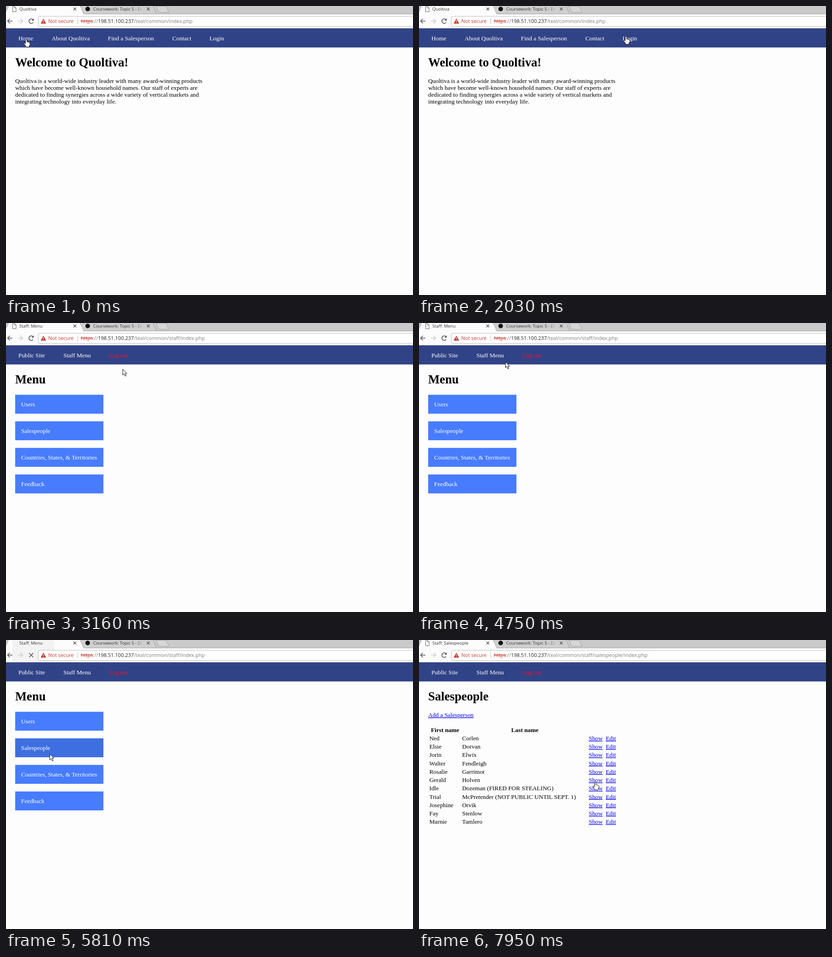
These frames come from a looping animation (887x631 px, 8 s). An HTML page:

```html
<!DOCTYPE html>
<html lang="en">
<head>
<meta charset="utf-8">
<title>Staff site walkthrough</title>
<style>
  html, body { margin: 0; width: 100%; height: 100%; overflow: hidden; background: #fdfdfd; }
  svg { display: block; width: 887px; height: 631px; }
  text { white-space: pre; }
  .ui { font: 11px "Open Sans", sans-serif; fill: #7c7c7c; }
  .tab { font-size: 9.5px; fill: #333; }
  .page { font: 13.3px "Liberation Serif", serif; }
  .title { font-size: 26.6px; font-weight: bold; }
  .bold { font-weight: bold; }
  .white { fill: #fff; }
  .red { fill: #f31225; }
  .under { fill: #00e; text-decoration: underline; }
  .line { fill: none; stroke: #555; stroke-width: 1.6; }
  .edge { stroke: #a2a2a2; }
</style>
</head>
<body>
<svg viewBox="0 0 887 631">
  <defs>
    <linearGradient id="fade">
      <stop offset="0" stop-color="#cfcfcf" stop-opacity="0"/>
      <stop offset=".8" stop-color="#cfcfcf"/>
    </linearGradient>
  </defs>
  <rect width="887" height="631" fill="#fdfdfd"/>

  <!-- browser tabs -->
  <rect width="887" height="18" fill="#cacaca"/>
  <path class="edge" d="M160 -1H320L328 17.5H160Z" fill="#cfcfcf"/>
  <path class="edge" d="M327 .5H349L355.5 14H335Q333 14 332 12Z" fill="#d6d6d6"/>
  <path class="edge" d="M-1 17.5V14L6 -1H161L169 17.5H888" fill="none"/>
  <path d="M0 19V14L6 0H161L169 18H887V48H0Z" fill="#fcfcfc"/>
  <rect id="loadPatch" x="14" y="1" width="91" height="47" fill="#f3f3f3"/>
  <path id="pageIcon" d="M14.5 1.5H19L22 4.5V12.5H14.5ZM19 1.5V4.5H22" fill="#fff" stroke="#666"/>
  <text id="tabTitle" class="ui tab" x="29" y="10"></text>
  <circle cx="178" cy="6.5" r="5" fill="#111"/>
  <text class="ui tab" x="190" y="10">Coursework: Topic 5 - Dr</text>
  <rect x="282" width="21" height="16" fill="url(#fade)"/>
  <path class="line" d="M147 3.5l6 6m0-6l-6 6M307 3.5l6 6m0-6l-6 6" style="stroke-width:1.4"/>

  <!-- toolbar -->
  <path class="line" d="M14 33H3.5M8.5 28L3.5 33L8.5 38"/>
  <path class="line" d="M26 33H36.5M31.5 28L36.5 33L31.5 38" style="stroke:#cbcbcb"/>
  <g id="reload">
    <path class="line" d="M59 36A5 5 0 1 1 58.5 29.4"/>
    <path d="M60.5 27V32H55.5Z" fill="#555"/>
  </g>
  <path id="stop" class="line" d="M50.5 28.5l9 9m0-9l-9 9"/>
  <rect x="70.5" y="22.5" width="830" height="22" rx="2" fill="#fff" stroke="#bdbdbd"/>
  <path d="M81.5 27.5L87.5 38.5H75.5Z" fill="#c5372c"/>
  <path d="M81.5 31V34.5M81.5 35.7V37" stroke="#fff" stroke-width="1.3"/>
  <text class="ui" x="92" y="37" style="fill:#c5372c">Not secure</text>
  <path d="M156.5 27V40" stroke="#bbb"/>
  <text class="ui" x="163" y="37"><tspan fill="#c5372c" text-decoration="line-through">https</tspan>://<tspan fill="#222">198.51.100.237</tspan><tspan id="urlPath"></tspan></text>
  <path d="M0 48.5H887" stroke="#b9b9b9"/>
  <rect y="49" width="887" height="41.5" fill="#314387"/>

  <g id="pages" class="page"></g>
  <g id="cursor" stroke="#111" fill="#fff" stroke-linejoin="round">
    <path id="hand" d="M-1.5 1.2Q0-.8 1.5 1.2V6.2Q3.2 5 4.2 6.8Q6 6 6.6 7.8Q8.3 7.4 8.3 9.5V12.5L6.6 15V17.5H-1V15.5L-4.6 10.5Q-5 8.6-3.2 8.8L-1.5 10.3Z"/>
    <path id="arrow" d="M.5 .8V13.7L3.5 10.9L5.7 16L7.8 15.1L5.7 10.2H9.5Z"/>
  </g>
</svg>

<script>
const LOOP = 8000, LOAD_START = 5810;
const $ = id => document.getElementById(id);
const text = (x, y, content, cls = '') => `<text x="${x}" y="${y}" class="${cls}">${content}</text>`;
const nav = items => items.map(([x, label, cls = 'white']) => text(x, 74.5, label, 'link ' + cls)).join('');
const heading = label => text(20, 132, label, 'title');

const staffNav = nav([[27, 'Public Site'], [125, 'Staff Menu'], [225, 'Log out', 'link red']]);

const intro = [
  'Quoltiva is a world-wide industry leader with many award-winning products',
  'which have become well-known household names. Our staff of experts are',
  'dedicated to finding synergies across a wide variety of vertical markets and',
  'integrating technology into everyday life.'
];

const buttons = ['Users', 'Salespeople', 'Countries, States, &amp; Territories', 'Feedback'];

const people = [
  'Ned|Corlen', 'Elsie|Dorvan', 'Jorin|Elwix', 'Walter|Fendleigh', 'Rosalie|Garrimor', 'Gerald|Holven',
  'Idle|Dozeman (FIRED FOR STEALING)', 'Trial|McPretender (NOT PUBLIC UNTIL SEPT. 1)',
  'Josephine|Orvik', 'Fay|Stenlow', 'Marnie|Tamlero'
];

const personRow = (person, i) => {
  const y = 219 + 18.22 * i, [first, last] = person.split('|');
  return text(22.5, y, first) + text(94, y, last) +
    text(370, y, 'Show', 'link under') + text(407, y, 'Edit', 'link under');
};

const pages = [
  {
    start: 0, tab: 'Quoltiva', path: '/teal/common/index.php',
    body: nav([[27, 'Home'], [99.5, 'About Quoltiva'], [222, 'Find a Salesperson'], [362.5, 'Contact'], [443.5, 'Login']]) +
      heading('Welcome to Quoltiva!') + intro.map((line, i) => text(20, 168 + 15 * i, line)).join('')
  },
  {
    start: 2170, tab: 'Staff: Menu', path: '/teal/common/staff/index.php',
    body: staffNav + heading('Menu') + buttons.map((label, i) =>
      `<rect class="button" x="20" y="${156.7 + 58 * i}" width="192.3" height="41.3"/>` +
      text(33, 181.7 + 58 * i, label, 'link white')).join('')
  },
  {
    start: 5950, tab: 'Staff: Salespeople', path: '/teal/common/staff/salespeople/index.php',
    body: staffNav + heading('Salespeople') + text(20, 168, 'Add a Salesperson', 'link under') +
      text(26, 201, 'First name', 'bold') + text(201, 201, 'Last name', 'bold') + people.map(personRow).join('')
  }
];
$('pages').innerHTML = pages.map(page => `<g>${page.body}</g>`).join('');
pages.forEach((page, i) => page.group = $('pages').children[i]);

// Pointer moves: first step, last step, step count, waypoints of the hotspot.
const moves = [
  [280, 1230, 8, [[150, 58], [300, 60], [407, 70]]],
  [1360, 1360, 1, [[379, 71]]],
  [1500, 1500, 1, [[444, 68]]],
  [1880, 1880, 1, [[451, 66]]],
  [2580, 2730, 2, [[312, 107]]],
  [3010, 3160, 2, [[253.5, 100]]],
  [3760, 4750, 8, [[210, 102], [134, 99], [188, 84]]],
  [4870, 5810, 8, [[170, 110], [125, 190], [95, 248]]],
  [6090, 6610, 4, [[95, 248], [134, 211.5]]],
  [6750, 6990, 3, [[289, 214]]],
  [7140, 7950, 7, [[350, 245], [406, 285], [384, 310]]]
];

function pointerAt(time) {
  let pos = [44, 72];
  for (const [first, last, count, waypoints] of moves) {
    if (time < first) break;
    const gap = (last - first) / Math.max(1, count - 1);
    const step = Math.min(count, 1 + Math.floor((time - first) / (gap || 1) + 1e-6));
    const route = [pos, ...waypoints];
    const along = step / count * waypoints.length;
    const leg = Math.min(Math.floor(along), waypoints.length - 1);
    pos = route[leg].map((from, axis) => Math.round(from + (route[leg + 1][axis] - from) * (along - leg)));
  }
  return pos;
}

const show = (element, visible) => element.style.display = visible ? '' : 'none';

function contains(element, [x, y]) {
  const box = element.getBBox();
  return x >= box.x && x <= box.x + box.width && y >= box.y && y <= box.y + box.height;
}

function draw(time) {
  const current = pages.filter(page => page.start <= time).pop();
  pages.forEach(page => show(page.group, page === current));
  $('tabTitle').textContent = current.tab;
  $('urlPath').textContent = current.path;

  const loading = time >= LOAD_START && current === pages[1];
  show($('loadPatch'), loading);
  show($('stop'), loading);
  show($('reload'), !loading);
  show($('pageIcon'), !loading);

  const pos = pointerAt(time);
  const onLink = [...current.group.querySelectorAll('.link')].some(link => contains(link, pos));
  current.group.querySelectorAll('.button').forEach(button =>
    button.setAttribute('fill', contains(button, pos) ? '#3e6fe0' : '#487cfe'));
  $('cursor').setAttribute('transform', `translate(${pos})`);
  show($('hand'), onLink);
  show($('arrow'), !onLink);
}

const started = performance.now();
function tick() {
  draw((performance.now() - started) % LOOP);
  requestAnimationFrame(tick);
}
tick();
</script>
</body>
</html>
```
